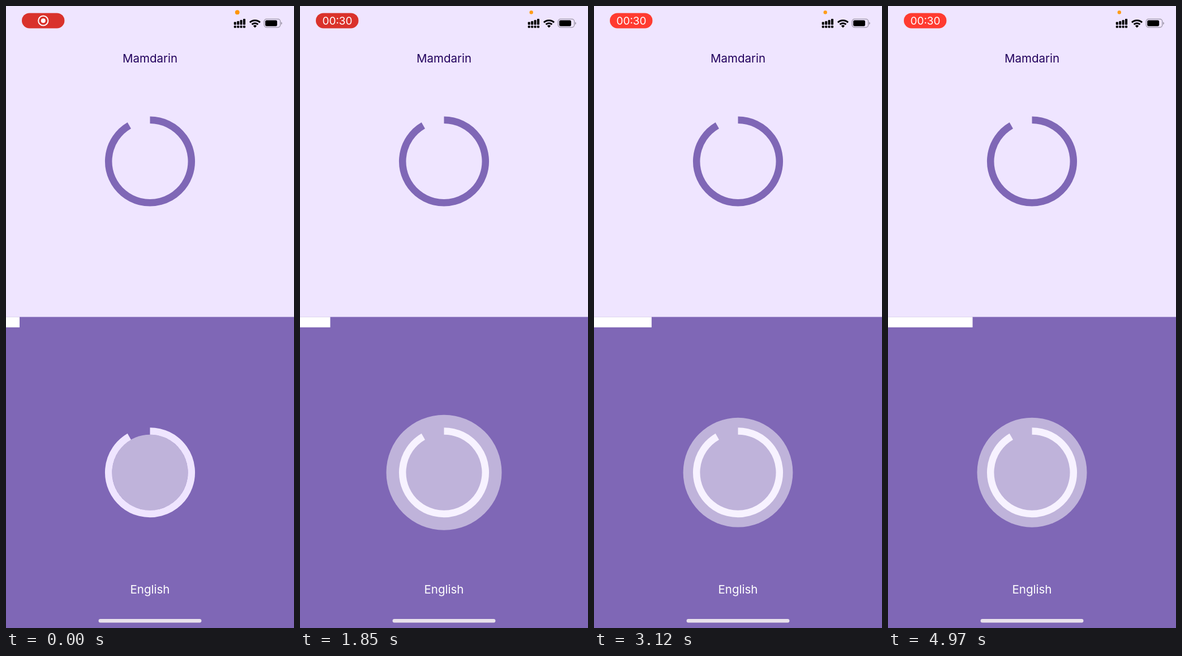
Animation of 509 by 1101 pixels, one loop 5000 ms. Source, as an HTML page:

```html
<!DOCTYPE html>
<html lang="en">
<head>
<meta charset="utf-8">
<title>Voice translator</title>
<style>
  html, body { margin: 0; width: 100%; height: 100%; overflow: hidden; background: #7f67b6; }
  svg { display: block; }
  text { font-family: Inter, Roboto, sans-serif; text-anchor: middle; }
  .label { font-size: 20.5px; }
  .ring { fill: none; stroke-width: 12.5; }
</style>
</head>
<body>
<svg width="509" height="1101" viewBox="0 0 509 1101">
  <rect width="509" height="1101" fill="#7f67b6"/>
  <rect width="509" height="550.4" fill="#efe5ff"/>

  <!-- status bar -->
  <rect id="pill" x="28" y="12.4" width="75.4" height="27" rx="13.5"/>
  <g id="record" fill="none" stroke="#fff" stroke-width="2">
    <circle r="8.6"/>
    <circle r="4" fill="#fff" stroke="none"/>
  </g>
  <text id="clock" x="66" y="33" font-size="19" fill="#fff">00:30</text>
  <circle id="dot" cx="408.8" cy="11.2" fill="#ff9500"/>
  <g id="signal"></g>
  <g fill="none" stroke="#000" stroke-width="3">
    <path d="M431 29.2A13 13 0 0 1 449 29.2"/>
    <path d="M434.6 32.6A7.8 7.8 0 0 1 445.4 32.6"/>
    <path d="M440 38.4L436.9 35.2A4.5 4.5 0 0 1 443.1 35.2Z" fill="#000" stroke="none"/>
  </g>
  <rect x="456.2" y="23.2" width="28.6" height="14.6" rx="4.2" fill="none" stroke="#9c95a6" stroke-width="1.3"/>
  <rect x="458.2" y="25.2" width="21" height="10.6" rx="2.4"/>
  <path d="M486.2 28.2a2.5 2.5 0 0 1 0 4.8z" fill="#9c95a6"/>

  <text class="label" x="254.5" y="99.6" fill="#21005d">Mamdarin</text>
  <path class="ring" stroke="#7f67b6" transform="translate(254.5 275)" d="M0 -73.3A73.3 73.3 0 1 1 -36.65 -63.48"/>

  <rect id="bar" y="550.4" height="18.4" fill="#fff"/>
  <path class="ring" stroke="#efe5ff" transform="translate(254.5 825.7)" d="M0 -73.3A73.3 73.3 0 1 1 -36.65 -63.48"/>
  <circle id="voice" cx="254.5" cy="825.7" fill="#fff" fill-opacity=".5"/>
  <text class="label" x="254.5" y="1040" fill="#fff">English</text>
  <rect x="163.6" y="1085" width="181.8" height="6.4" rx="3.2" fill="#e9e2ec"/>
</svg>
<script>
  const LOOP = 5000, STEP = 509 / 20;
  const $ = id => document.getElementById(id);
  const set = (id, attrs) => {
    for (const key in attrs) $(id).setAttribute(key, attrs[key]);
  };
  const clamp = x => Math.min(1, Math.max(0, x));
  const mix = (a, b, k) => a + (b - a) * k;
  const smooth = x => x * x * (3 - 2 * x);

  // four bars over four dots, one column per strength level
  $('signal').innerHTML = [5, 6.4, 8.4, 10.4].map((h, i) => {
    const x = 402.8 + i * 5.4;
    return `<rect x="${x}" y="${33.2 - h}" width="4.1" height="${h}" rx="1"/>` +
           `<rect x="${x}" y="34.8" width="4.1" height="4" rx="1"/>`;
  }).join('');

  // cubic-bezier(.25, .1, .25, 1)
  function ease(x) {
    let lo = 0, hi = 1;
    const curve = (u, a, b) => 3 * (1 - u) * (1 - u) * u * a + 3 * (1 - u) * u * u * b + u * u * u;
    for (let i = 0; i < 24; i++) {
      const mid = (lo + hi) / 2;
      if (curve(mid, .25, .25) < x) lo = mid; else hi = mid;
    }
    return curve(lo, .1, 1);
  }

  // [time, radius] of the voice level circle
  const levels = [
    [0, 67], [300, 96], [390, 96], [800, 91], [1300, 95], [1600, 102], [1850, 102],
    [2080, 94], [2320, 102], [2730, 90], [3150, 97], [3670, 91.5], [4050, 94.5],
    [4360, 90], [4920, 97], [LOOP, 97]
  ];
  function voiceRadius(t) {
    const i = levels.findIndex(p => p[0] > t);
    const [t0, r0] = levels[i - 1], [t1, r1] = levels[i];
    return mix(r0, r1, smooth((t - t0) / (t1 - t0)));
  }

  function draw(t) {
    // progress advances one step per second
    const tick = t + 175;
    const done = Math.floor(tick / 1000) + ease(clamp(tick % 1000 / 250));
    set('bar', { width: STEP * done });

    set('voice', { r: voiceRadius(t) });

    const glow = clamp(.625 * (1 - Math.cos(2 * Math.PI * t / 1950)));
    set('pill', { fill: `rgb(${mix(217, 255, glow)},${mix(50, 59, glow)},${mix(43, 48, glow)})` });

    const out = clamp((t - 150) / 300);
    set('record', { opacity: 1 - out, transform: `translate(65.8 26) scale(${1 - .25 * out})` });
    set('clock', { opacity: clamp((t - 120) / 290) });

    const fade = clamp((t - 1500) / 250);
    set('dot', { r: mix(3.9, 3.2, fade), 'fill-opacity': mix(1, .9, fade) });
  }

  function frame() {
    draw(performance.now() % LOOP);
    requestAnimationFrame(frame);
  }
  frame();
</script>
</body>
</html>
```
